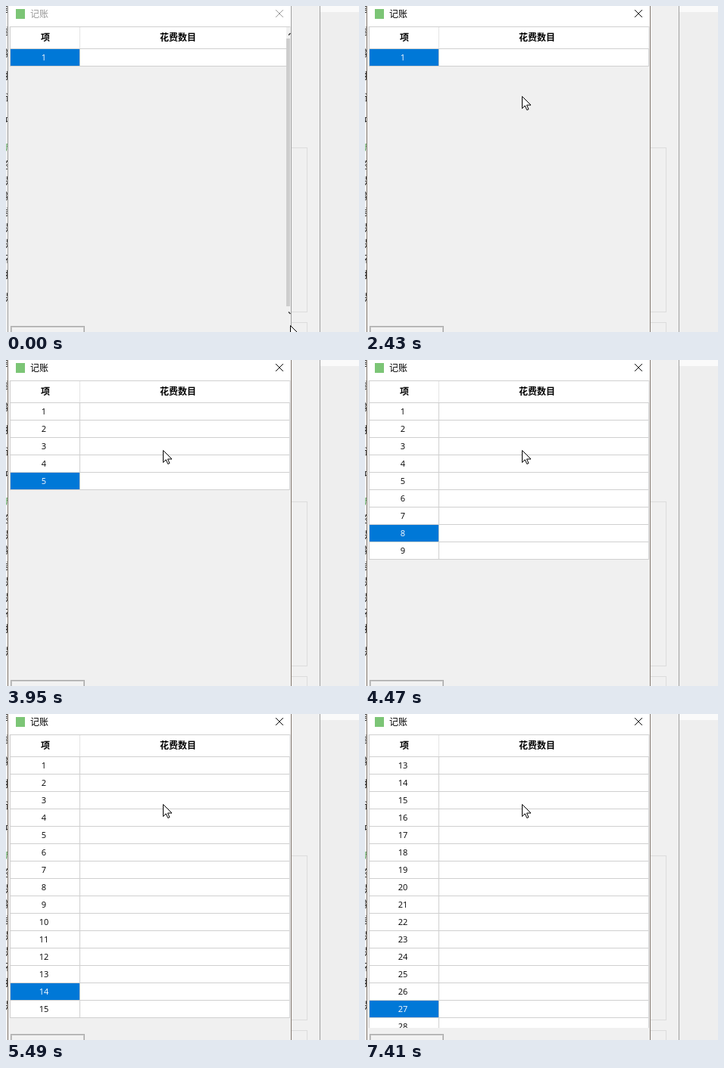
Animation, 466 px wide and 431 px high, one loop 8000 ms. Source, as an HTML page:

```html
<!DOCTYPE html>
<html lang="zh-CN">
<head>
<meta charset="utf-8">
<style>
  html, body { margin: 0; width: 100%; height: 100%; overflow: hidden; background: #f0f0f0; }
  svg { display: block; shape-rendering: crispEdges; }
  text { font: 12px "Noto Sans CJK SC", "Noto Sans CJK", "Noto Sans", sans-serif; }
  .head { font-weight: 700; text-anchor: middle; }
  .num { font: 11px "Open Sans", "Noto Sans", sans-serif; text-anchor: middle; }
  .frame { fill: none; stroke: #dcdcdc; }
  .grid { fill: #d0d0d0; }
  .smooth { shape-rendering: geometricPrecision; }
</style>
</head>
<body>
<svg width="466" height="431" viewBox="0 0 466 431">
  <defs><clipPath id="view"><rect x="5" y="57" width="370" height="358"/></clipPath></defs>

  <!-- window behind -->
  <rect width="466" height="431" fill="#f0f0f0"/>
  <g id="labels"></g>
  <path class="frame" d="M370 187.5H397.5V404.5H370M370 418.5H397.5V431"/>
  <rect x="414" width="1" height="431" fill="#a0a0a0"/>
  <rect x="415" width="51" height="8" fill="#fafafa"/>
  <rect x="415" y="8" width="51" height="423" fill="#eee"/>

  <!-- dialog -->
  <rect id="border" x="2" width="375" height="431"/>
  <rect x="3" width="373" height="431" fill="#f0f0f0"/>
  <rect x="3" width="373" height="27" fill="#fff"/>
  <rect x="13" y="4" width="12" height="13" fill="#7cc576"/>
  <text id="title" x="32" y="15">记账</text>
  <path id="close" class="smooth" d="M356.5 5.5L365.5 14.5M365.5 5.5L356.5 14.5" stroke-linecap="square"/>
  <rect x="6" y="423" width="98" height="12" fill="#adadad"/>
  <rect x="7" y="424" width="96" height="12" fill="#c4c4c4"/>
  <rect x="8" y="425" width="94" height="12" fill="#f2f2f2"/>

  <!-- table -->
  <rect class="grid" x="5" y="27" width="370" height="30"/>
  <rect x="6" y="28" width="369" height="28" fill="#fff"/>
  <path d="M97.5 28V56M374.5 28V56" stroke="#e5e5e5"/>
  <text class="head" x="52" y="46">项</text>
  <text class="head" x="227" y="46">花费数目</text>
  <g id="rows" clip-path="url(#view)"></g>

  <g id="scroll">
    <rect x="370" y="28" width="6" height="387" fill="#f0f0f0"/>
    <rect x="370" y="43" width="5" height="354" fill="#cdcdcd"/>
    <path class="smooth" d="M373 38.5L375.5 36M373 404.5L375.5 407" stroke="#333" stroke-width="1.4"/>
  </g>
  <path id="cursor" class="smooth" d="M.5 .5V16.5L4.2 12.8L6.8 18.5L9 17.5L6.5 12H12Z" fill="#fff" stroke="#000"/>
</svg>
<script>
const LOOP = 8000, ROW_H = 23, TOP = 57, FULL_ROWS = 15;
const TICK = 73.2, TICK_START = 66;   // the table repaints at this rhythm
// Pace of typing as [ms, row] points
const added = [[3316, 2], [3975, 6], [4927, 12], [6025, 18], [7196, 26], [7342, 28]];
const picked = [[3477, 2], [4868, 11], [6112, 18], [7284, 26], [7357, 27]];

const $ = id => document.getElementById(id);
const set = (el, name, value) => el.setAttribute(name, value);

function rowAt(points, t) {
  if (t < points[0][0]) return 1;
  const next = points.findIndex(p => p[0] > t);
  if (next < 0) return points.at(-1)[1];
  const [t0, r0] = points[next - 1], [t1, r1] = points[next];
  return Math.floor(r0 + (r1 - r0) * (t - t0) / (t1 - t0));
}

// Labels of the window behind, cut off by the dialog: a loose group, then a dense one
const label = (char, y, color = '#111') => `<text x="-1" y="${y}" fill="${color}">${char}</text>`;
$('labels').innerHTML =
  [...'类类数排说中'].map((c, i) => label(c, 8 + 29.6 * i)).join('') +
  label('成', 191, '#4a9a4a') +
  [...'签是数类是是花排'].map((c, i) => label(c, 215 + 20.7 * i)).join('') +
  label('是', 390);

$('rows').innerHTML = Array.from({ length: FULL_ROWS + 1 }, (_, i) => `
  <g transform="translate(0 ${TOP + i * ROW_H})">
    <rect class="grid" x="5" width="370" height="23"/>
    <rect x="6" width="368" height="22" fill="#fff"/>
    <rect class="grid" x="97" width="1" height="22"/>
    <rect x="6" width="91" height="22" fill="#0078d7"/>
    <text class="num" x="50" y="15"></text>
  </g>`).join('');
const rows = [...$('rows').children];

function draw() {
  const t = performance.now() % LOOP;
  const painted = TICK_START + Math.floor((t - TICK_START) / TICK) * TICK;
  const count = rowAt(added, painted), selected = rowAt(picked, painted);
  const first = Math.max(1, selected - FULL_ROWS + 1);

  rows.forEach((row, i) => {
    const n = first + i, on = n === selected;
    const [, , , mark, number] = row.children;
    set(row, 'visibility', n <= count ? 'visible' : 'hidden');
    set(mark, 'opacity', on ? 1 : 0);
    set(number, 'fill', on ? '#fff' : '#000');
    number.textContent = n;
  });

  const active = t >= 2430;
  set($('border'), 'fill', active ? '#83786f' : '#a0a0a0');
  set($('title'), 'fill', active ? '#000' : '#999');
  set($('close'), 'stroke', active ? '#000' : '#999');
  set($('scroll'), 'visibility', t < 200 ? 'visible' : 'hidden');

  // The pointer glides in six steps
  const p = Math.max(0, Math.min(6, Math.floor((t - 60) / 70) + 1)) / 6;
  const ease = p * p * (3 - 2 * p);
  set($('cursor'), 'transform', `translate(${Math.round(375 - 168 * ease)} ${Math.round(422 - 303 * ease)})`);
  requestAnimationFrame(draw);
}
draw();
</script>
</body>
</html>
```
